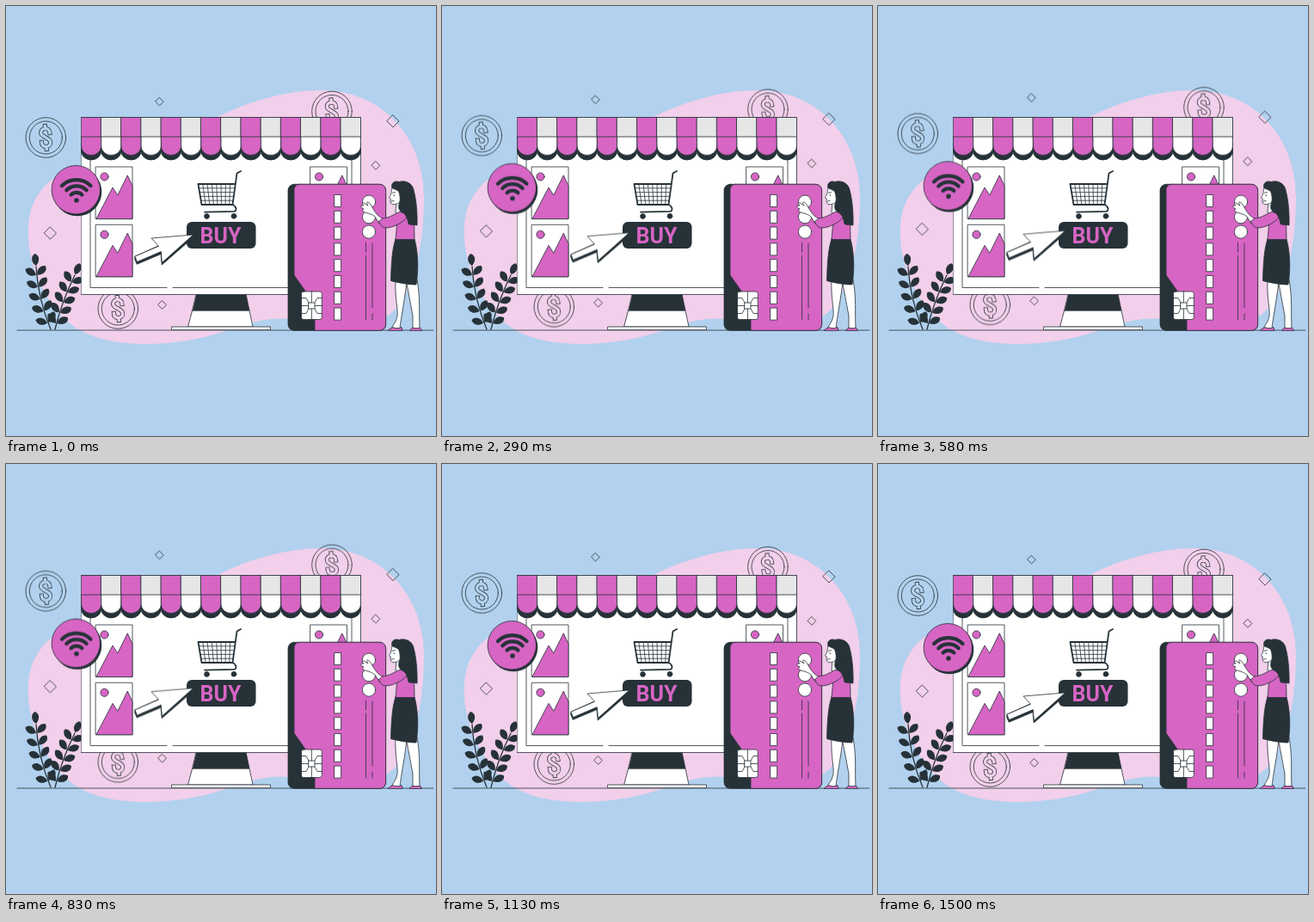
An HTML page that plays this animation: 500 px wide and 500 px high, repeating every 1.54 s.

```html
<!DOCTYPE html>
<html lang="en">
<head>
<meta charset="utf-8">
<title>Online shop</title>
<style>
  html, body { margin: 0; width: 100%; height: 100%; overflow: hidden; background: #b2d1ee; }
  svg { display: block; width: 100vw; height: 100vh; }
  .ink { stroke: #263238; stroke-width: .8; stroke-linejoin: round; stroke-linecap: round; }
  .line { fill: none; }
  .pink { fill: #d665c3; }
  .white { fill: #fff; }
  .grey { fill: #e6e6e6; }
  .dark { fill: #263238; }
  .buy { font: 700 25px Roboto, sans-serif; font-stretch: 75%; text-anchor: middle; }
</style>
</head>
<body>
<svg viewBox="0 0 500 500">
  <path fill="#f2cfea" d="M250 127C285 110 330 97 372 98C440 101 486 155 486 222C486 270 478 315 458 346C440 372 400 380 360 370C330 361 305 361 270 373C235 386 200 393 160 393C110 392 80 380 60 355C36 325 24 290 26 255C28 225 45 203 70 192L200 150Z"/>
  <path class="ink line" d="M13 377H497"/>
  <g id="back"></g>
  <g id="plants"></g>

  <!-- monitor -->
  <g class="ink">
    <path class="white" d="M217 354H283L287 373H212Z"/>
    <path class="dark" d="M221.5 335H279L283 354H217Z"/>
    <rect class="white" x="193" y="373" width="114.5" height="3.6"/>
    <rect class="white" x="87.5" y="129.5" width="325" height="206"/>
    <path class="line" d="M98 170V327.5H187M194 327.5H402V170"/>
  </g>
  <g id="awning" class="ink"></g>
  <g id="pictures" class="ink"></g>

  <!-- cart -->
  <g class="ink line">
    <path id="grid"/>
    <path stroke-width="1.8" style="stroke-width:1.8" d="M273 192L268.5 194.5L263.5 231H227.5L223.5 207H266.5M263.5 231C268 233 269 238.5 265 238.8L231 239.6"/>
    <circle class="dark" cx="233.5" cy="244.5" r="2.9"/>
    <circle class="dark" cx="265" cy="244.3" r="2.9"/>
  </g>

  <rect class="dark" x="210" y="251" width="80.5" height="31" rx="6"/>
  <text class="pink buy" x="249.5" y="276">BUY</text>

  <g class="float ink">
    <path class="dark" d="M217.5 266L218 269L181.2 301L180 288.5L152.2 300.3L149.6 294L149.9 291.2L177 279Z"/>
    <path class="white" d="M217.5 266L169 270L177.5 279.2L149.9 291.2L152.5 297.5L180.3 285.6L181.4 298.2Z"/>
  </g>

  <!-- badge -->
  <g class="float">
    <circle class="dark" cx="83" cy="216" r="28.3"/>
    <circle class="pink ink" cx="81.3" cy="213.7" r="28.2"/>
    <circle class="dark" cx="82" cy="226" r="2.8"/>
    <path class="ink line" style="stroke-width:4.2" d="M65 209A24 24 0 0 1 98.5 209M70.3 214.3A16.5 16.5 0 0 1 93.7 214.3M75.6 219.6A9 9 0 0 1 88.4 219.6"/>
  </g>

  <!-- card -->
  <g class="ink">
    <rect class="dark" x="328" y="207.3" width="113.6" height="170" rx="7"/>
    <path class="pink" d="M341 207.3H434.6a7 7 0 0 1 7 7V370.3a7 7 0 0 1 -7 7H359V347L335 313V213.3a6 6 0 0 1 6-6Z"/>
    <rect class="white" x="343.5" y="332" width="23.8" height="32.5" rx="2.5"/>
    <path class="line" d="M355.4 332V345M355.4 352V364.5M343.5 348.5H352M359 348.5H367.3M352 345H359V352H352ZM343.5 339.5H349L352 345M367.3 339.5H362L359 345M343.5 357.5H349L352 352M367.3 357.5H362L359 352"/>
    <path class="line" d="M418.5 275V286M418.5 290V365M426 276V351M426 358V365"/>
    <g id="marks" class="white"></g>
  </g>

  <!-- woman -->
  <g class="ink">
    <path class="white" d="M453 318C452 340 456 352 455 360C454 367 450 371 448 375H458C459 364 464 340 466 320ZM465 318C469 338 471 350 473 360V375H481C480 355 482 340 478 318Z"/>
    <path class="pink" d="M444.5 377.3C445 375 448 375.2 450 373.5C454 375.5 457 375 460 373.5L461 377.3ZM469.5 377.3C470 375.5 472 375 473 374C476 375.5 479 375 481.5 374L483.5 377.3Z"/>
    <path class="dark" d="M453 271H475C479 285 480 305 477 324C468 324 456 322 447.5 319.5C448 300 449 282 453 271Z"/>
    <path class="white" d="M454 227L453 240L462 246L470 238L464 222Z"/>
    <path class="white" d="M438 247.5C433 245 430 241 427 236C425 233 424 230 421 228C419 227.5 419.5 230 421 232L416 229C413.5 228.5 414 230.5 416 232L413.5 232C411.5 233 414 235 416 236L414.5 237.5C415 239.5 418 240.5 421 241C424 242 427 243 429 245L434 253Z"/>
    <path class="pink" d="M433.5 250.5L438 246.8C445 246.5 451 242.5 457 239.5C464 240 471 240 474.5 244L475 271.5H453L454.5 254.5C449 257.5 443 258.5 439 257.5C436 256 434.5 253 433.5 250.5Z"/>
    <path class="line" d="M454.5 254.5C460 252 464 249 466 246"/>
    <path class="white" d="M450 209C448 213 448.5 217 447.5 219C446.5 221 445 222.5 446 223.5L447.3 224C447 226 446.5 228.5 449 230.5C453 231.5 459 229 461 224L462 210Z"/>
    <path class="dark" d="M449 211.5C447 206 452 202.5 457 204.5C463 202.5 471 205 473.5 212C477 224 478.5 240 478 255C474 254 470 255 468 253.5C467 247 465 242 460 239.5C456.5 238 456 233 457.5 229C459 225 458 219 456.5 215.5C454 213.5 451 213 449 211.5Z"/>
    <path class="line" d="M449.5 217.3L452.5 216.6M448.3 227L451 226.5M451.3 219.5V220.8"/>
  </g>
</svg>
<script>
const NS = 'http://www.w3.org/2000/svg';
const byId = id => document.getElementById(id);

function add(parent, tag, attrs) {
  const el = document.createElementNS(NS, tag);
  for (const k in attrs) el.setAttribute(k, attrs[k]);
  return parent.appendChild(el);
}

const back = byId('back');
const DOLLAR = 'M5-5C5-9 2.5-10.5 0-10.5C-3.7-10.5-5.3-8-5.3-5.5C-5.3-1 5 .5 5 5.5C5 9 2.7 10.5 0 10.5C-3.5 10.5-5.3 8.5-5.3 5M0-10.5V-13.5M0 10.5V13.5';

function coin(x, y, ground) {
  const g = add(add(back, 'g', { class: 'float' }), 'g', { transform: `translate(${x} ${y})` });
  for (const r of [23.3, 19]) add(g, 'circle', { r, class: 'ink line' });
  for (const [stroke, width] of [['#263238', 5], [ground, 3.5]]) {
    add(g, 'path', { d: DOLLAR, fill: 'none', stroke, 'stroke-width': width,
      'stroke-linecap': 'square', transform: 'rotate(-4)' });
  }
}
coin(46.3, 153, '#b2d1ee');
coin(379, 122.5, '#f2cfea');
coin(130.3, 352, '#f2cfea');

const diamonds = [[178.5, 111.3, 4.7], [450, 134, 7], [430, 185.5, 4.8], [51.5, 264.2, 7], [181.7, 347.6, 4.8]];
for (const [x, y, r] of diamonds) {
  add(back, 'path', { class: 'float ink line', d: `M${x} ${y - r}l${r} ${r}l${-r} ${r}l${-r} ${-r}Z` });
}

// Leaves grow in pairs along a quadratic stem.
function plant(x0, y0, x1, y1, x2, y2) {
  const g = byId('plants');
  add(g, 'path', { class: 'ink line', d: `M${x0} ${y0}Q${x1} ${y1} ${x2} ${y2}`, style: 'stroke-width:1.3' });
  const leaf = (t, turn) => {
    const u = 1 - t;
    const x = u * u * x0 + 2 * u * t * x1 + t * t * x2;
    const y = u * u * y0 + 2 * u * t * y1 + t * t * y2;
    const dx = u * (x1 - x0) + t * (x2 - x1);
    const dy = u * (y1 - y0) + t * (y2 - y1);
    const angle = Math.atan2(dy, dx) * 180 / Math.PI + turn;
    add(g, 'path', { class: 'dark', d: 'M1 0C5-6 12-5.5 15-1C13 5 6 5 1 0Z',
      transform: `translate(${x} ${y}) rotate(${angle})` });
  };
  for (let t = .1; t < .95; t += .19) { leaf(t, -52); leaf(t, 52); }
  leaf(1, 0);
}
plant(52, 376, 37, 340, 35, 303);
plant(57, 376, 65, 343, 80, 313);

const awning = byId('awning'), stripe = 325 / 14;
const flap = (i, top, bottom) => {
  const x = 87.5 + i * stripe;
  return `M${x} ${top}V${bottom}a${stripe / 2} 10.5 0 0 0 ${stripe} 0V${top}Z`;
};
for (let i = 0; i < 14; i++) add(awning, 'path', { class: 'dark', d: flap(i, 160, 168.5) });
for (let i = 0; i < 14; i++) {
  add(awning, 'path', { class: i % 2 ? 'white' : 'pink', d: flap(i, 152, 163) });
  add(awning, 'rect', { class: i % 2 ? 'grey' : 'pink', x: 87.5 + i * stripe, y: 129.5, width: stripe, height: 22.5 });
}

for (const [x, y] of [[104.5, 187], [104.5, 254.3], [354, 187]]) {
  const g = add(byId('pictures'), 'g', { transform: `translate(${x} ${y})` });
  add(g, 'rect', { class: 'white', width: 42.5, height: 60.3 });
  add(g, 'circle', { class: 'pink', cx: 10, cy: 11.5, r: 4.6 });
  add(g, 'path', { class: 'pink', d: 'M.5 60.3L19.5 24L25.3 33L36.8 9.8L42.5 22V60.3Z' });
}

let grid = '';
for (let i = 1; i < 8; i++) grid += `M${223.5 + i * 5.3} 207L${227.5 + i * 4.6} 231`;
for (let i = 1; i < 5; i++) grid += `M${223.5 + i * .8} ${207 + i * 4.8}H${266.5 - i * .6}`;
byId('grid').setAttribute('d', grid);

const marks = byId('marks');
for (let i = 0; i < 8; i++) add(marks, 'rect', { x: 382, y: 219.5 + i * 18.8, width: 7.6, height: 14 });
// The hand overlaps the upper two dots.
for (const y of [227.7, 245.2, 262.6]) add(marks, 'circle', { cx: 422, cy: y, r: 7.6 });

// Up and down at constant speed, then a short rest.
const LOOP = 1540, RISE = 6;
const move = [[0, 0], [750, -RISE], [1500, 0], [LOOP, 0]].map(([t, y]) => (
  { offset: t / LOOP, transform: `translateY(${y}px)` }
));
for (const el of document.querySelectorAll('.float')) {
  const anim = el.animate(move, { duration: LOOP, iterations: Infinity });
  anim.startTime = 0;
}
</script>
</body>
</html>
```
